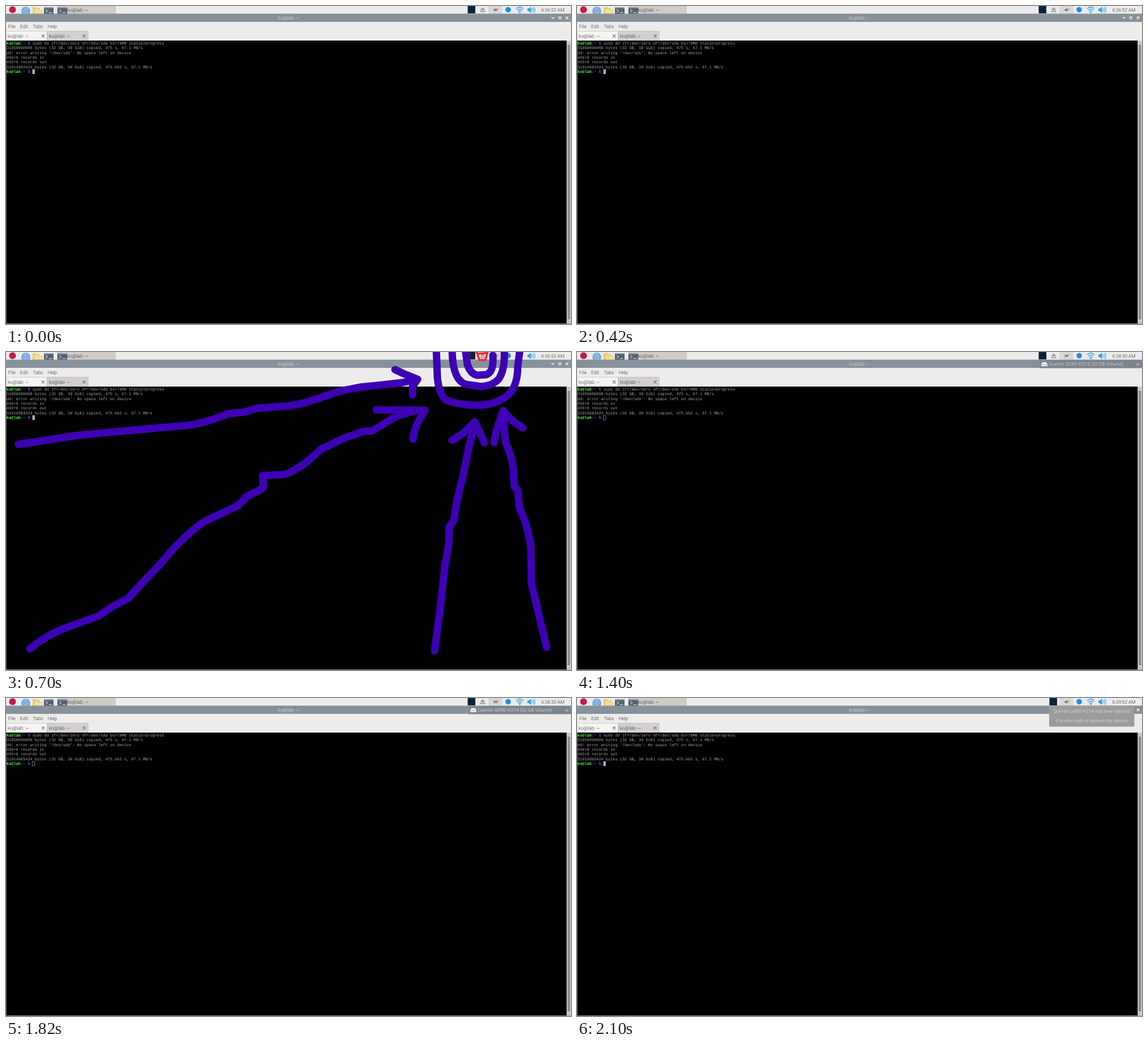
Recreate the animation shown at these times as an HTML page. Size 998 by 561 pixels, loop 2.8 s.

```html
<!DOCTYPE html>
<html lang="en">
<head>
<meta charset="utf-8">
<title>Ejecting a drive</title>
<style>
  html, body { margin: 0; width: 100%; height: 100%; overflow: hidden; background: #000; }
  svg { display: block; width: 998px; height: 561px; }
  text { font: 300 8.35px Roboto, sans-serif; fill: #2e2e2e; white-space: pre; text-rendering: geometricPrecision; }
  .term text { font: 6.93px "Liberation Mono", monospace; fill: #aaa; }
  .term .user { fill: #5f5; font-weight: bold; }
  .term .path { fill: #55f; font-weight: bold; }
  .light text, text.light { fill: #e6e8ea; }
  text.temp { font: 500 6px Roboto, sans-serif; }
  .line { fill: none; stroke-linecap: round; stroke-linejoin: round; }
</style>
</head>
<body>
<svg viewBox="0 0 998 561">
  <defs>
    <g id="console">
      <path d="M0 2h17v12H0z" fill="#536171"/>
      <path d="M0 2h17v2H0z" fill="#8d98a3"/>
      <path class="line" d="M3 6l4 2.5-4 2.5M9 11.5h5" stroke="#e5e9ed"/>
    </g>
    <path id="cross" class="line" d="M-2-2l4 4m0-4l-4 4"/>
    <path id="eject" d="M0-4.5l4.7 5.5h-9.4zM-4.7 2.2h9.4v2h-9.4z"/>
  </defs>

  <!-- Taskbar -->
  <path d="M0 0h998v14H0z" fill="#edeceb"/>
  <path d="M90 0h104v14H90z" fill="#cfccc8"/>
  <circle cx="11.5" cy="6.5" r="6" fill="#c51a4a"/>
  <circle cx="35" cy="9" r="7.8" fill="#5d9bdc"/>
  <path class="line" d="M27.5 9h15M29 5q6 2 12 0M29 13q6-2 12 0M35 1.5v15M35 1.5q-8 7 0 15M35 1.5q8 7 0 15" stroke="#c5def5" stroke-width=".7"/>
  <path d="M47 2h6l2 2h5v10H47z" fill="#e9cb72"/>
  <path d="M50 5h6l2 2h6v7H50z" fill="#f7df97" stroke="#dfbd60" stroke-width=".5"/>
  <use href="#console" x="67"/>
  <use href="#console" x="91"/>
  <text x="108" y="10">ko@lab: ~</text>

  <!-- Tray -->
  <path d="M815.5 0H829v13h-13.5z" fill="#08243f" data-on="012"/>
  <path d="M834.5 0H848v13h-13.5z" fill="#08243f" data-on="3"/>
  <use href="#eject" x="842" y="6.5" fill="#9b9b9b" data-on="012"/>
  <path d="M852 0h24.5v13.5H852z" fill="#d9d8d7"/>
  <text class="temp" x="865.5" y="9.3" text-anchor="middle" data-on="013">40°</text>
  <text class="temp" x="865.5" y="9.3" text-anchor="middle" data-on="2">39°</text>
  <circle cx="887" cy="6.5" r="4.8" fill="#1c8ce8"/>
  <g class="line" stroke="#27a3ee" stroke-width="1.3">
    <path d="M901.5 4.500q6-5.500 12 0M903.5 7.300q4-3.700 8 0M905.5 9.800q2-1.800 4 0"/>
    <path d="M929 4.500q1.500 2.200 0 4.500M931 3q2.500 3.700 0 7.500M933 1.500q3 5.200 0 10.500" stroke-width="1"/>
  </g>
  <circle cx="907.5" cy="11.5" r="1.2" fill="#27a3ee"/>
  <path d="M921 4.500h2.500l4-3.500v11.500l-4-3.500H921z" fill="#27a3ee"/>
  <text x="986.5" y="9.8" text-anchor="end" id="clock"></text>

  <!-- Window frame -->
  <path d="M0 13.500h998V28H0z" fill="#87919b"/>
  <text class="light" x="499" y="23.8" text-anchor="middle">ko@lab: ~</text>
  <g class="line" stroke="#fff" stroke-width="1.2">
    <path d="M964 20l2 2 2-2M976.5 19h3.500v3.500h-3.500z"/>
    <use href="#cross" x="991" y="20.8"/>
  </g>
  <path d="M0 28h998v33H0z" fill="#edeceb"/>
  <text y="39"><tspan x="4">File</tspan><tspan x="25">Edit</tspan><tspan x="47.5">Tabs</tspan><tspan x="73.5">Help</tspan></text>
  <path d="M.5 61V44.500h72V61" fill="#f6f5f4" stroke="#c6c4c2" stroke-width=".8"/>
  <path d="M73 61V44.500h72V61" fill="#d3d1cf" stroke="#b9b7b5" stroke-width=".8"/>
  <text x="3" y="56">ko@lab: ~</text>
  <text x="76" y="56">ko@lab: ~</text>
  <g stroke="#666" stroke-width="1.2">
    <use href="#cross" x="65.5" y="53"/>
    <use href="#cross" x="138" y="53"/>
  </g>

  <!-- Terminal -->
  <path d="M0 61h998v500H0z" fill="#8b8b8b"/>
  <path d="M.7 61h989.800v499H.7z"/>
  <path d="M990.5 61h7.500v499h-7.500z" fill="#d5d4d3"/>
  <path d="M992 68h4.500v485H992z" fill="#8d8d8d"/>
  <path class="line" d="M992.5 65.500l1.800-2 1.800 2M992.5 556l1.800 2 1.800-2" stroke="#777" stroke-width=".8"/>
  <g class="term" id="term"></g>
  <path d="M46.5 111.500H51v8.500h-4.500z" fill="#aaa" data-on="013"/>
  <path d="M46.8 111.800h4v8h-4z" class="line" stroke="#aaa" stroke-width=".7" data-on="2"/>

  <!-- Hand-drawn pointers -->
  <g data-on="1" class="line" stroke="#3d00b5" stroke-width="13">
    <path d="M22 163L127 147 190 141 325 129Q350 125 385 112L391 109 420 106 445 99 500 95Q525 91 545 84L590 69 625 62 665 58 700 54 727 48M687 31L702 38 727 48 718 61V76"/>
    <path d="M42 524Q72 498 110 485L163 466 190 448 215 435 240 408 270 377Q310 327 350 299L410 271 425 255 453 241 455 235 453 218 490 216Q502 215 530 195L557 171 600 151 632 140 647 139 690 113 720 104M654 102L740 103Q719 135 719 154"/>
    <path d="M757 527L766 460 775 380 782 340 783 308 791 297 796 265 808 215 815 180 828 124M788 156L808 143 828 123 838 145 845 160"/>
    <path d="M955 521L928 408 927 345Q924 312 907 275L904 245 898 238 896 205Q893 182 882 158L878 104M862 160L866 140 878 103 895 122 913 134"/>
    <path d="M760-6L762 45Q765 76 778 85 800 94 838 94 870 92 890 73 904 56 904 25L908-6"/>
    <path d="M788-6Q788 49 812 57L840 61Q860 59 870 48 882 32 880-6"/>
    <path d="M811-6L815 22Q820 38 832 41L848 40Q862 36 860 6"/>
    <path d="M831-1L836 14H847L851-1M834 3L848 2" stroke="#f5252d" stroke-width="3.5"/>
  </g>

  <!-- Drive menu and notice -->
  <g class="light" data-on="2">
    <path d="M817 14h181v14.500H817z" fill="#7c858e"/>
    <path d="M822 18h7l2 4v3h-11v-3z" fill="#eee"/>
    <path d="M821 22.500h9" stroke="#8b949c" stroke-width=".7"/>
    <text x="833.5" y="24.3">Quenlix QXRD-K274 (32 GB Volume)</text>
    <use href="#eject" transform="translate(990.5 21.5) scale(.5)" fill="#b8bdc2"/>
  </g>
  <g class="light" data-on="3" text-anchor="middle">
    <rect x="834" y="13.5" width="150.5" height="37" rx="1.5" fill="#9c9c9c"/>
    <text x="909" y="26.3">Quenlix QXRD-K274 has been ejected</text>
    <text x="909" y="43.3">It is now safe to remove the device</text>
  </g>
</svg>
<script>
  const prompt = '<tspan class="user">ko@lab</tspan>:<tspan class="path">~ $ </tspan>';
  const lines = [
    prompt + 'sudo dd if=/dev/zero of=/dev/sda bs=70MB status=progress',
    '31850000000 bytes (32 GB, 30 GiB) copied, 475 s, 67.1 MB/s',
    "dd: error writing '/dev/sda': No space left on device",
    '456+0 records in',
    '455+0 records out',
    '31914983424 bytes (32 GB, 30 GiB) copied, 475.662 s, 67.1 MB/s',
    prompt
  ];
  document.getElementById('term').innerHTML =
    lines.map((line, i) => `<text x="1" y="${68 + i * 8.32}">${line}</text>`).join('');

  const clock = document.getElementById('clock');
  const times = ['6:36:52 AM', '6:36:52 AM', '6:38:30 AM', '6:39:52 AM'];
  const parts = document.querySelectorAll('[data-on]');
  const stepLength = 700;

  function draw() {
    const step = Math.floor(performance.now() / stepLength) % times.length;
    clock.textContent = times[step];
    for (const part of parts) part.style.display = part.dataset.on.includes(step) ? '' : 'none';
    requestAnimationFrame(draw);
  }
  draw();
</script>
</body>
</html>
```
